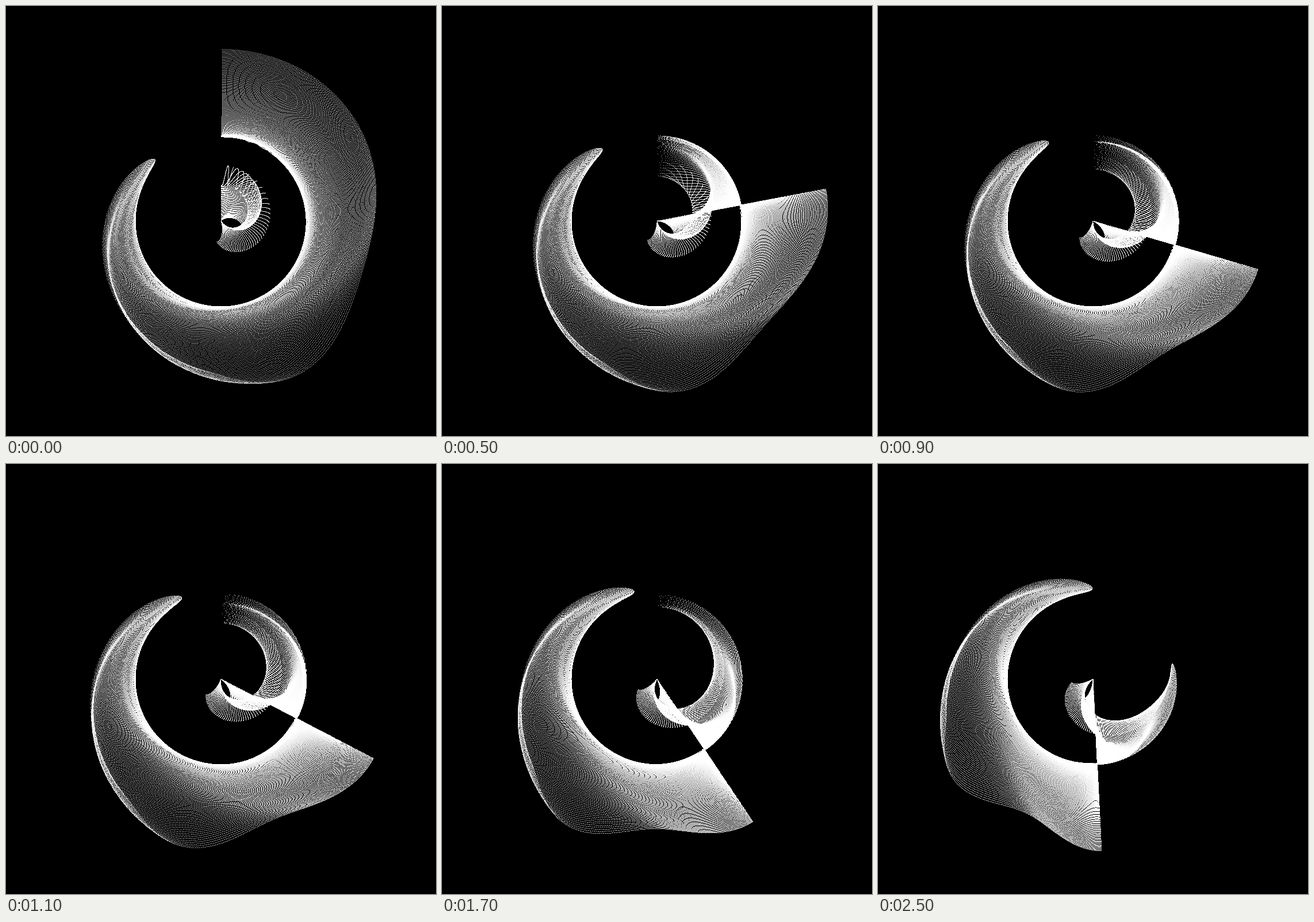
Write an HTML page with a canvas that moves like this. It is 748 px wide and 748 px high and loops after 2550 ms.

```html
<!DOCTYPE html>
<html>
<head>
<meta charset="utf-8">
<style>
  html, body { margin: 0; width: 100%; height: 100%; overflow: hidden; background: #000; }
  canvas { display: block; width: 748px; height: 748px; }
</style>
</head>
<body>
<canvas id="stage" width="748" height="748"></canvas>
<script>
const SIZE = 748, CENTER = 374;
const STEP_MS = 50, STEPS = 51;
const ROWS = 400, COLS = 500;
const TURN = 0.4372;      // radians per square root of a step
const MID_RADIUS = 149;
const DOT_ALPHA = 0.68;

const ctx = document.getElementById('stage').getContext('2d');
const image = ctx.createImageData(SIZE, SIZE);
const pixels = new Uint32Array(image.data.buffer);
const light = new Float32Array(SIZE * SIZE);

// Every dot keeps its radius; its phase sets how far round it has travelled.
const phase = new Float32Array(ROWS * COLS);
const radius = new Float32Array(ROWS * COLS);

function buildSheet() {
  let n = 0;
  for (let row = 0; row < ROWS; row++) {
    const v = 2 * row / (ROWS - 1) - 1;
    const q = Math.abs(v);
    const swing = Math.sin(Math.PI * v);
    const base = 130.5 * Math.pow(q, 2.8);
    const wave = 21 * q ** 3 / (q ** 3 + 0.1);
    const reach = 58 + 98 * swing;
    const waveTurns = 3 * Math.PI + 0.5 * swing;
    for (let col = 1; col <= COLS; col++) {
      const x = (col / COLS) ** 2;
      const ripple = Math.cos(waveTurns * Math.pow(x, 0.93));
      phase[n] = x * reach;
      radius[n] = Math.abs(MID_RADIUS + Math.sign(v) * (base + wave * ripple));
      n++;
    }
  }
}

function draw(step) {
  light.fill(0);
  for (let n = 0; n < phase.length; n++) {
    const travelled = step + phase[n];
    if (travelled < 0) continue;
    const angle = TURN * Math.sqrt(travelled);
    const x = Math.floor(CENTER + radius[n] * Math.sin(angle));
    const y = Math.floor(CENTER - radius[n] * Math.cos(angle));
    const i = y * SIZE + x;
    light[i] += (1 - light[i]) * DOT_ALPHA;
  }
  for (let i = 0; i < light.length; i++) {
    pixels[i] = 0xff000000 + Math.round(light[i] * 255) * 0x010101;
  }
  ctx.putImageData(image, 0, 0);
}

let shown = -1;
const start = performance.now();

function tick() {
  const step = Math.floor((performance.now() - start) / STEP_MS) % STEPS;
  if (step !== shown) {
    draw(step);
    shown = step;
  }
  requestAnimationFrame(tick);
}

buildSheet();
tick();
</script>
</body>
</html>
```
